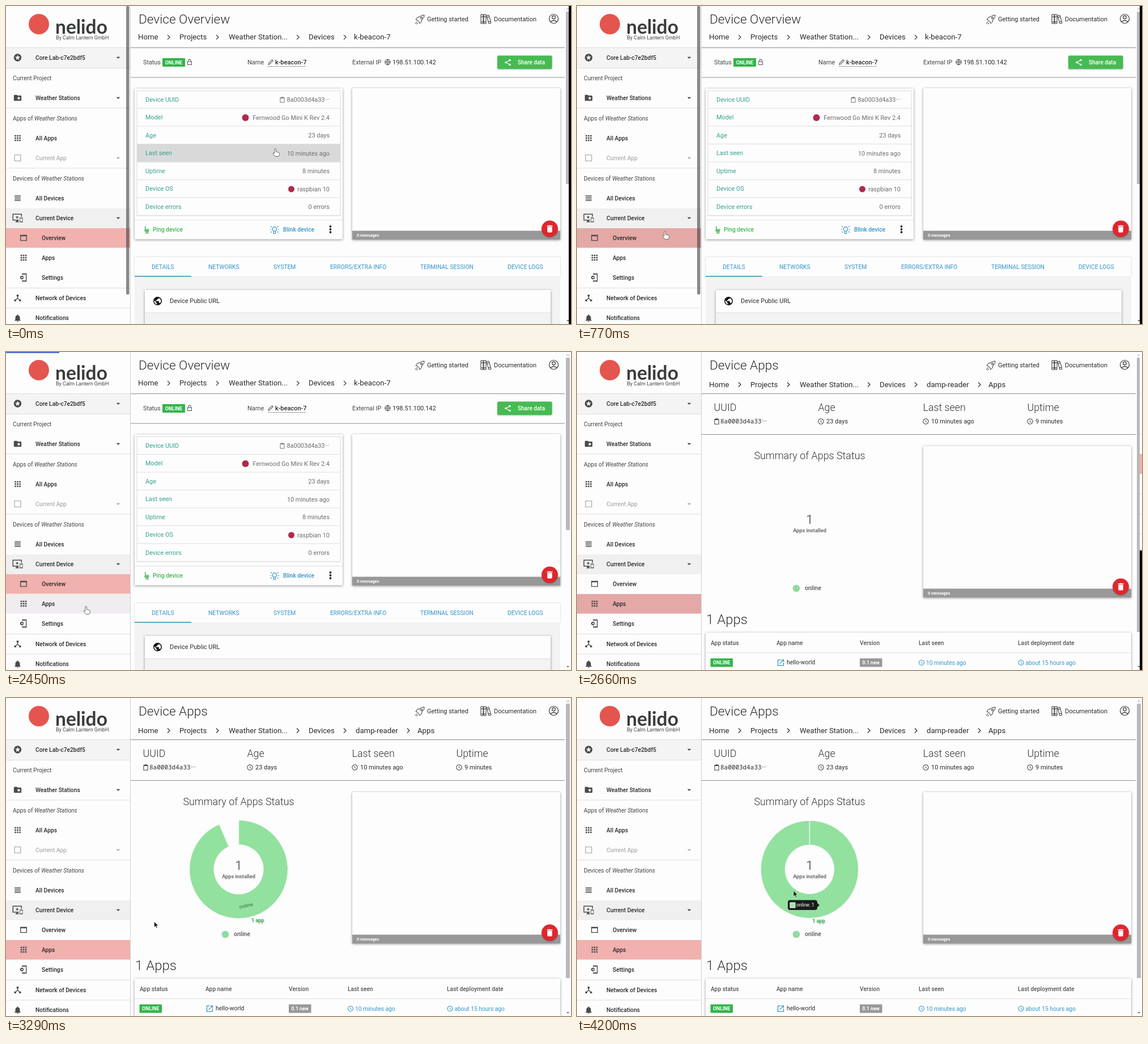
These frames come from a looping animation (997x561 px, 4410 ms). An HTML page:

```html
<!DOCTYPE html>
<html lang="en">
<head>
<meta charset="utf-8">
<title>Device dashboard</title>
<style>
html, body { margin: 0; width: 100%; height: 100%; overflow: hidden; background: #fdfdfd; }
svg { display: block; width: 997px; height: 561px; font-family: Roboto, sans-serif; }
text { white-space: pre; }
.card { fill: #fdfdfd; filter: drop-shadow(0 1px 2px rgba(0,0,0,.42)); }
.soft { fill: #fdfdfd; filter: drop-shadow(0 0 1px rgba(0,0,0,.25)); }
</style>
</head>
<body>
<svg id="stage" viewBox="0 0 997 561"></svg>
<script>
const LOOP = 4410, STEP = 70;
const INK = '#2b2b2b', GREY = '#6d6d6d', TEAL = '#35a08f', BLUE = '#3595c8', GREEN = '#3fb950';

// drawing helpers; text is placed by the middle of its capitals
const text = (x, y, s, size = 10.3, fill = INK, weight = 400, anchor = 'start', more = '') =>
  `<text x="${x}" y="${y + size * .355}" font-size="${size}" fill="${fill}" font-weight="${weight}" text-anchor="${anchor}" ${more}>${s}</text>`;
const rect = (x, y, w, h, fill, more = '') =>
  `<rect x="${x}" y="${y}" width="${w}" height="${h}" fill="${fill}" ${more}/>`;
const box = (x, y, w, h, cls = 'card') => `<rect class="${cls}" x="${x}" y="${y}" width="${w}" height="${h}" rx="1"/>`;
const dot = (x, y, r, fill, more = '') => `<circle cx="${x}" cy="${y}" r="${r}" fill="${fill}" ${more}/>`;
const line = (d, color = INK, w = 1, more = '') =>
  `<path d="${d}" fill="none" stroke="${color}" stroke-width="${w}" ${more}/>`;
const hr = (x1, x2, y, color = '#dedede', w = 1) => line(`M${x1} ${y}H${x2}`, color, w);
const at = (x, y, s) => `<g transform="translate(${x} ${y})">${s}</g>`;
const icon = (d, x, y, size = 16, fill = '#444') =>
  `<path transform="translate(${x - size / 2} ${y - size / 2}) scale(${size / 24})" d="${d}" fill="${fill}" fill-rule="evenodd"/>`;
const group = (id, s) => `<g id="${id}">${s}</g>`;

const grid = [4, 10, 16].flatMap(y => [4, 10, 16].map(x => `M${x} ${y}h4v4h-4z`)).join('');
const ICON = {
  drop: 'M7 10l5 5 5-5z',
  star: 'M12 2a10 10 0 1 0 .01 0zM16.2 18L12 15.4 7.8 18l1.1-4.8-3.7-3.2 4.9-.4L12 5l1.9 4.5 4.9.4-3.7 3.2z',
  folder: 'M10 4H4a2 2 0 0 0-2 2v12a2 2 0 0 0 2 2h16a2 2 0 0 0 2-2V8a2 2 0 0 0-2-2h-8zM18 17l-3-1.7-3 1.7.8-3.3-2.6-2.3 3.5-.3L15 8l1.3 3.1 3.4.3-2.5 2.3z',
  blank: 'M3 3h18v18H3zM5 5v14h14V5z',
  lines: 'M4 5h16v2H4zm0 4h16v2H4zm0 4h16v2H4zm0 4h16v2H4z',
  screens: 'M0 2h22v7h-2V4H2v12h13v2h-2v2h2v2H7v-2h2v-2H0zM17 11h7v11h-7zM18 13v7h5v-7zM11 6l1 3h3l-2.5 1.8.9 2.9-2.4-1.8-2.5 1.8 1-2.9L7 9h3z',
  window: 'M3 4h18v16H3zM5 8v10h14V8z',
  phone: 'M8 1h12v22H8v-4h2v1h8V4h-8v1H8zM8 7l2 1 2 2v4l-2 2-2 1-3-1-2-2v-4l2-2zM8 10a2 2 0 1 0 .01 0z',
  hub: 'M17 16l-4-4V8.8a3 3 0 1 0-2 0V12l-4 4H3v5h5v-3l4-4.2 4 4.2v3h5v-5z',
  bell: 'M12 22a2 2 0 0 0 2-2h-4a2 2 0 0 0 2 2zM18 16v-5c0-3-1.6-5.6-4.5-6.3V4a1.5 1.5 0 0 0-3 0v.7C7.6 5.4 6 8 6 11v5l-2 2v1h16v-1z',
  bin: 'M6 7h12v12a2 2 0 0 1-2 2H8a2 2 0 0 1-2-2zM5 4h3.5l1-1h5l1 1H19v2H5z',
  globe: 'M12 2a10 10 0 1 0 .01 0zM11 19.9A8 8 0 0 1 4.2 10.2L9 15v1a2 2 0 0 0 2 2zM17.9 17.4A2 2 0 0 0 16 16h-1v-3a1 1 0 0 0-1-1H8v-2h2a1 1 0 0 0 1-1V7h2a2 2 0 0 0 2-2v-.4a8 8 0 0 1 2.9 12.8z',
  open: 'M3 3h9v2H5v14h14v-7h2v9H3zM14 3h7v7h-2V6.4l-9.3 9.3-1.4-1.4L17.6 5H14z',
  clip: 'M4 4h4V2h8v2h4v18H4zM6 7v13h12V7z',
  clock: 'M12 2a10 10 0 1 0 .01 0zM12 4a8 8 0 1 1-.01 0zM11 7h1.6v5l4.2 2.5-.8 1.3L11 13z',
  lock: 'M4 9h3V6a5 5 0 0 1 10 0v3h3v13H4zM9 9h6V6a3 3 0 0 0-6 0zM6 11v9h12v-9z',
  pencil: 'M2 22l2-7L17 2l5 5L9 20zM6 16l-1 3 3-1L19 7l-2-2z',
  hand: 'M7 2h3v8h9v6l-2 3H9l-5-6h3zM9 20h9v3H9z'
};

// sidebar
const item = (y, path, label, x = 52, ix = 20.5, color = INK, size = 16) =>
  icon(path, ix, y, size, color === INK ? '#4a4a4a' : color) + text(x, y, label, 10.25, color, 500);
const section = (y, head, tail) => text(12, y, `${head} <tspan font-style="italic">${tail}</tspan>`, 10.25, '#444');

function sidebar() {
  const ends = [73.5, 109.5, 180, 286, 497.5, 533];
  return rect(0, 0, 219, 561, '#fdfdfd') +
    rect(0, 74, 219, 35, '#f4f4f4') + rect(0, 357, 219, 35, '#f0f0f0') +
    rect(0, 392, 219, 34.5, '#f1b1ae', 'id="rowOverview"') + rect(0, 427, 219, 34.5, '#f1b1ae', 'id="rowApps"') +
    ends.map(y => hr(0, 219, y)).join('') +
    dot(58, 32, 18, '#e4554f') +
    text(87, 37.5, 'nelido', 33.5, '#3a3b3d', 700, 'start', 'font-family="Lato, sans-serif"') +
    text(88, 56, 'By Calm Lantern GmbH', 9, '#444') +
    item(91, ICON.star, 'Core Lab-c7e2bdf5') + section(127, 'Current Project', '') +
    item(162, ICON.folder, 'Weather Stations') + section(198, 'Apps of', 'Weather Stations') +
    item(233, grid, 'All Apps') + item(268, ICON.blank, 'Current App', 52, 20.5, '#b0b0b0') +
    section(304, 'Devices of', 'Weather Stations') +
    item(339, ICON.lines, 'All Devices') + item(374, ICON.screens, 'Current Device', 52, 20.5, INK, 18) +
    item(409, ICON.window, 'Overview', 63, 31) + item(444, grid, 'Apps', 63, 31) + item(479, ICON.phone, 'Settings', 63, 31) +
    item(515, ICON.hub, 'Network of Devices') + item(550.5, ICON.bell, 'Notifications') +
    [91, 162, 374].map(y => icon(ICON.drop, 198, y, 16)).join('') + icon(ICON.drop, 198, 268, 16, '#aaa') +
    line('M219.5 0V561', '#d2d2d2') +
    rect(212, 0, 5.5, 509, 'rgba(60,60,60,.6)', 'id="sideThumb" rx="2"');
}

// shared parts of both pages
function header(title, crumbs, y) {
  const chevrons = [287, 373, 515, 598, 710].slice(0, crumbs.length - 1);
  const xs = [233, 306, 393, 534, crumbs.length > 5 ? 617 : 614, 726];
  const rocket = line('M-8 7l4-4M-6 8l3-2M-4 1l-3-1 3-4 4-1C2-7 5-8 8-8c0 3-1 6-4 8l-1 4-3 3-1-3zM-4 1l3 3') + dot(3, -3, 1.6, 'none', 'stroke="#2b2b2b"');
  const books = line('M-9-8h4V8h-4zM-4-8h4V8h-4zM1-6l4-1 4 14-4 1zM-9-4h9M-9 5h9M2-3l4-1M4 5l4-1');
  return text(234, 23, title, 22.6, INK, 300) +
    crumbs.map((c, i) => text(xs[i], y, c, 13.2, INK)).join('') +
    chevrons.map(x => line(`M${x - 2} ${y - 3.5}l4 4-4 4`, INK, 1.2)).join('') +
    at(730, 24, rocket) + text(743, 23, 'Getting started', 11) +
    at(847, 23, books) + text(861, 23, 'Documentation', 11) +
    dot(966.5, 22.5, 8, 'none', 'stroke="#333" stroke-width="1.2"') + dot(966.5, 20, 2.8, 'none', 'stroke="#333" stroke-width="1.2"') +
    line('M961 28q5.5-5 11 0', '#333', 1.2) +
    hr(219, 986, 73.5, '#a9a9a9', 1.3);
}
const messages = y => box(611, y, 367, 267) + rect(611, y + 251.5, 367, 15.5, '#989898') +
  text(619, y + 259.5, '0 messages', 7.3, '#fff', 700) +
  dot(959.5, y + 248, 14.4, '#e0262d', 'style="filter:drop-shadow(0 1px 1px rgba(0,0,0,.3))"') + icon(ICON.bin, 959.5, y + 248, 17, '#fff');
const scroller = bottom => rect(988, 10, 7, bottom - 10, '#b9b9b9') +
  icon(ICON.drop, 991.5, 555, 11, '#555') + line('M989 7l2.5-3 2.5 3', '#999', 1);
const badge = (x, y, w, fill, label, size = 8.7) =>
  rect(x, y - 7.5, w, 15, fill, 'rx="1"') + text(x + w / 2, y, label, size, '#fff', 700, 'middle');

const ROW = 31.5, TOP = 149.5;
function overview() {
  const rows = [['Device UUID', '8a0003d4a33···'], ['Model', 'Fernwood Go Mini K Rev 2.4'], ['Age', '23 days'],
    ['Last seen', '10 minutes ago'], ['Uptime', '8 minutes'], ['Device OS', 'raspbian 10'], ['Device errors', '0 errors']];
  const tabs = [[257, 'DETAILS'], [357, 'NETWORKS'], [472, 'SYSTEM'], [572, 'ERRORS/EXTRA INFO'], [731, 'TERMINAL SESSION'], [885, 'DEVICE LOGS']];
  const bulb = dot(0, -1, 3.7, 'none', `stroke="${BLUE}" stroke-width="1.2"`) +
    line('M-1.5 3v4h3V3M-8 0h2M6 0h2M-7-6l2 1.5M7-6L5-4.5M-7 5l2-1.5M7 5L5 3.5', BLUE, 1.2);
  const wire = dot(0, 0, 4.8, 'none', 'stroke="#444"') + line('M-4.8 0H4.8M0-4.8V4.8M0-4.8q-5 4.8 0 9.6q5-4.8 0-9.6', '#444', .8);
  return header('Device Overview', ['Home', 'Projects', 'Weather Station...', 'Devices', 'k-beacon-7'], 54.6) +
    text(242, 99, 'Status', 10.8, '#444') + badge(276, 99.5, 40, '#32b549', 'ONLINE') + icon(ICON.lock, 324, 99, 12, '#555') +
    text(426, 99, 'Name', 11, '#444') + icon(ICON.pencil, 467, 99, 12, '#555') + text(475, 99, 'k-beacon-7', 11, INK, 500) +
    line('M462 106.5H529', '#777', 1, 'stroke-dasharray="2 1"') +
    text(611, 99, 'External IP', 10.8, '#444') + at(673.5, 99, wire) + text(682, 99, '198.51.100.142', 11) +
    rect(867, 87.5, 96.5, 23.5, '#46bb52', 'rx="2" style="filter:drop-shadow(0 1px 1px rgba(0,0,0,.3))"') +
    line('M889 95.5l-7 4 7 4', '#fff', 1.2) + dot(889, 95.5, 1.8, '#fff') + dot(882, 99.5, 1.8, '#fff') + dot(889, 103.5, 1.8, '#fff') +
    text(903, 99.5, 'Share data', 10, '#fff', 500) +
    hr(219, 986, 126, '#8f8f8f', 1.2) +
    box(227, 145.5, 367, 266) + rect(231, TOP, 359, ROW * 7, 'none', 'stroke="#ddd"') +
    rect(231, TOP, 359, ROW, '#d9d9d9', 'id="rowHover"') +
    rows.map(([k, v], i) => {
      const y = TOP + ROW * i;
      return hr(231, 590, y + ROW - .5) + text(246, y + 15.5, k, 10.9, TEAL) + text(571, y + 16, v, 10.9, GREY, 400, 'end');
    }).join('') +
    icon(ICON.clip, 487.5, 165.5, 12, '#777') +
    dot(422.5, 197, 6, '#b02a49') + dot(503.5, 323, 5.5, '#b02a49') +
    hr(227, 594, 377.5) +
    icon(ICON.hand, 248, 394.5, 15, '#6cc07a') + text(259, 394.5, 'Ping device', 10.25, GREEN, 500) +
    at(474, 394.5, bulb) + text(489, 394.5, 'Blink device', 10.25, BLUE, 500) +
    [389, 394, 399].map(y => dot(572.5, y, 1.9, '#222')).join('') +
    messages(145) +
    box(227, 443, 751, 34.5, 'soft') + rect(227, 477.5, 751, 84, '#f3f3f3') +
    tabs.map(([x, s]) => text(x, 460, s, 10.3, BLUE)).join('') + rect(227, 476, 100, 1.6, '#3c93b8') +
    box(245, 501, 716, 75) + rect(245, 541, 716, 20, '#f3f3f3') + hr(245, 961, 541) +
    icon(ICON.globe, 267.5, 520.5, 18, '#111') + text(289, 520, 'Device Public URL', 11) +
    scroller(314);
}

function apps() {
  const facts = [[242, 'UUID', ''], [426, 'Age', '23 days'], [611, 'Last seen', '10 minutes ago'], [795, 'Uptime', '9 minutes']];
  const cols = [[236, 'App status'], [352, 'App name'], [499, 'Version'], [603, 'Last seen'], [778, 'Last deployment date']];
  const when = (x, s) => icon(ICON.clock, x, 548, 12, BLUE) + text(x + 8, 548, s, 10.25, BLUE);
  return header('Device Apps', ['Home', 'Projects', 'Weather Station...', 'Devices', 'damp-reader', 'Apps'], 57) +
    facts.map(([x, k, v], i) => text(x - .5, 98, k, 17.8, '#333', 300) +
      icon(i ? ICON.clock : ICON.clip, x + 4.5, 122.5, 12.5) + (v ? text(x + 14, 122.5, v, 11) : '')).join('') +
    text(253, 122.5, '8a0003d4a33', 11, INK, 400, 'start', 'font-family="Noto Sans Mono, monospace"') + text(326, 122.5, '···', 11) +
    hr(219, 986, 145.5, '#8f8f8f', 1.2) +
    text(410.5, 183, 'Summary of Apps Status', 17.9, '#333', 300, 'middle') +
    '<path id="ring" stroke="#f6fbf6" stroke-width="1.3"/>' +
    text(0, 0, 'online', 9, '#3c6b45', 400, 'middle', 'id="arcLabel"') +
    text(0, 0, '1 app', 9, '#3bb35a', 700, 'start', 'id="tag" style="filter:drop-shadow(1px 2px 1px rgba(0,0,0,.25))"') +
    text(410.5, 295.5, '1', 22, GREY, 400, 'middle') + text(410.5, 315, 'Apps installed', 9.2, GREY, 700, 'middle') +
    dot(387, 417, 6.3, '#8fdc9f') + text(402, 416.5, 'online', 10.6, '#555', 500) +
    messages(166) +
    text(228, 471, '1 Apps', 24, '#333', 300) +
    box(227, 495, 751, 80) + hr(227, 978, 530.5) +
    cols.map(([x, s]) => text(x, 513, s, 10.3, '#555', 500)).join('') +
    badge(235.5, 548, 39.5, '#32b549', 'ONLINE') +
    icon(ICON.open, 359.5, 548, 15, BLUE) + text(370, 547.5, 'hello-world', 10.3) +
    badge(499, 548, 39.5, '#989898', '0.1 new', 8.6) +
    when(608, '10 minutes ago') + when(783.5, 'about 15 hours ago') +
    scroller(494) +
    group('tip', rect(372, 356.5, 52, 17.5, '#181c19', 'rx="4"') + '<path d="M423 361l5 4.5-5 4.5z" fill="#181c19"/>' +
      rect(376, 361, 9, 9, '#a9dfb2', 'stroke="#fff"') + text(387, 365, 'online: 1', 8.5, '#fff'));
}

const pointers =
  group('hand', '<path d="M-1.2 1a1.3 1.3 0 0 1 2.6 0v4.2l5.2 1.300q1.2.5 1 1.900L7 11l-1.200 2.500H.2L-3.600 8.800q-.9-1.200.2-1.700l2.200 1z" fill="#fff" stroke="#5a5a5a" stroke-width=".9"/>') +
  group('arrow', '<path d="M0 0v10l2.3-2 1.7 3.5 1.6-.8L4 7.300h3.200z" fill="#111" stroke="#fff" stroke-width=".6"/>');

const edge = group('edgeDark', rect(993, 0, 4, 561, '#000')) +
  group('edgeOld', rect(993, 0, 4, 350, '#fdfdfd') + rect(993, 180, 4, 35, '#f1b1ae') +
    [73, 145, 250, 286, 321].map(y => hr(993, 997, y)).join('') + rect(993, 350, 4, 211, '#000'));

const stage = document.getElementById('stage');
stage.innerHTML = rect(0, 0, 997, 561, '#fdfdfd') + group('overview', overview()) + group('apps', apps()) +
  sidebar() + edge + rect(0, 0, 0, 2, '#4a70cf', 'id="bar"') + pointers;
const el = {};
stage.querySelectorAll('[id]').forEach(n => el[n.id] = n);
const show = (n, on) => n.style.display = on ? '' : 'none';

// time helpers
const span = (t, a, b) => Math.min(1, Math.max(0, (t - a) / (b - a)));
const smooth = u => u * u * (3 - 2 * u);
const mix = (a, b, u) => a + (b - a) * u;

const NEXT_PAGE = 2660;
const MOVES = [[70, 630, 155, 398], [770, 1120, 141, 449], [3150, 3430, 382, 340]];
function pointerAt(t) {
  let p = [475, 252];
  for (const [a, b, x, y] of MOVES) {
    const u = smooth(span(t, a, b));
    p = [mix(p[0], x, u), mix(p[1], y, u)];
  }
  return p;
}

const polar = (r, a) => [410.5 + r * Math.sin(a), 302.3 - r * Math.cos(a)];
function drawRing(t) {
  const grown = 1 - (1 - span(t, 2690, 3690)) ** 3;
  const swell = 1 - smooth(span(t, 3080, 3360));
  const outer = mix(86.3, 90.3, swell), inner = mix(43, 46, swell);
  const sweep = Math.max(.01, grown * 2 * Math.PI - .002), big = sweep > Math.PI ? 1 : 0;
  for (const n of [el.ring, el.arcLabel, el.tag]) show(n, grown > 0);
  el.ring.setAttribute('d', `M${polar(outer, 0)}A${outer} ${outer} 0 ${big} 1 ${polar(outer, sweep)}` +
    `L${polar(inner, sweep)}A${inner} ${inner} 0 ${big} 0 ${polar(inner, 0)}Z`);
  el.ring.setAttribute('fill', swell > .5 ? '#8fdba3' : '#92e19f');
  const mid = sweep / 2, deg = mid * 180 / Math.PI;
  const [lx, ly] = polar((outer + inner) / 2, mid);
  el.arcLabel.setAttribute('transform', `translate(${lx} ${ly}) rotate(${deg > 90 ? deg - 180 : deg})`);
  const [tx, ty] = polar(mix(90, 99, swell), mid);
  el.tag.setAttribute('transform', `translate(${tx + mix(4.5, 1, swell)} ${ty})`);
}

function render(t) {
  const second = t >= NEXT_PAGE;
  const [x, y] = pointerAt(t);
  show(el.overview, !second);
  show(el.apps, second);

  const row = Math.floor((y - TOP) / ROW);
  const onRow = !second && x > 231 && x < 590 && row >= 0 && row < 7;
  show(el.rowHover, onRow);
  el.rowHover.setAttribute('y', TOP + ROW * row);

  const paint = (n, top, active) => {
    const over = x < 213 && y >= top && y < top + 35;
    n.setAttribute('fill', active ? (over ? '#e4a8a6' : '#f1b1ae') : (over ? '#efedef' : '#fdfdfd'));
  };
  paint(el.rowOverview, 392, !second);
  paint(el.rowApps, 427, second);

  el.sideThumb.style.opacity = 1 - span(t, 1610, 1960);
  show(el.edgeDark, t < 840);
  show(el.edgeOld, second && t < 3080);
  el.bar.setAttribute('width', second ? 0 : 94 * Math.max(0, t - 2100) / 350);

  const visible = !second || t > 3150;
  const linkArea = x < 219 || onRow;
  show(el.hand, visible && linkArea);
  show(el.arrow, visible && !linkArea);
  for (const n of [el.hand, el.arrow]) n.setAttribute('transform', `translate(${x} ${y})`);

  const far = Math.hypot(x - 410.5, y - 302.3);
  show(el.tip, second && far > 43 && far < 86);
  if (second) drawRing(t);
}

const start = performance.now();
function tick() {
  const t = Math.max(0, performance.now() - start) % LOOP;
  render(Math.floor(t / STEP) * STEP);
  requestAnimationFrame(tick);
}
tick();
</script>
</body>
</html>
```
